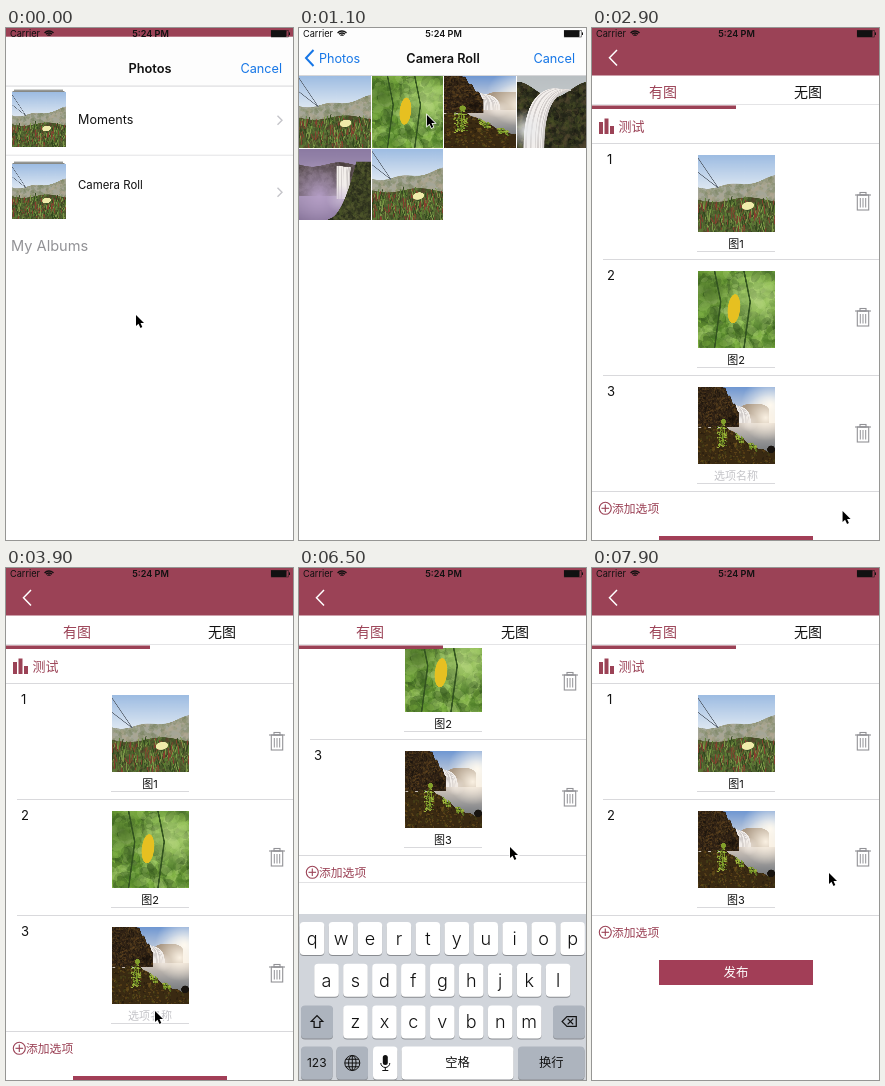
These frames come from a looping animation (287x512 px, 8 s). An HTML page with a canvas:

```html
<!DOCTYPE html>
<html lang="zh">
<head>
<meta charset="utf-8">
<title>Photo poll</title>
<style>
html, body { margin: 0; width: 100%; height: 100%; overflow: hidden; background: #fff; }
canvas { display: block; width: 287px; height: 512px; }
</style>
</head>
<body>
<canvas id="stage"></canvas>
<script>
const W = 287, H = 512, MID = 144, LOOP = 8000, STEP = 100, ROW = 116;
const MAROON = '#9b4256', BLUE = '#1676e6', RULE = '#d9d9dc', GRAY = '#929296', INK = '#111';
const FONT = 'Inter, "Noto Sans CJK SC", "DejaVu Sans", sans-serif';
const stage = document.getElementById('stage');
const dpr = window.devicePixelRatio || 1;
stage.width = W * dpr;
stage.height = H * dpr;
let c = stage.getContext('2d');

// Drawing helpers
let seed = 7;
const rnd = () => (seed = seed * 16807 % 2147483647) / 2147483647;
const between = (a, b) => a + (b - a) * rnd();

function rect(x, y, w, h, color) {
  c.fillStyle = color;
  c.fillRect(x, y, w, h);
}
function stroke(color, width) {
  c.strokeStyle = color;
  c.lineWidth = width;
  c.stroke();
}
function line(color, width, ...pts) {
  c.beginPath();
  for (let i = 0; i < pts.length; i += 2) c.lineTo(pts[i], pts[i + 1]);
  stroke(color, width);
}
function oval(x, y, rx, ry, color, angle = 0) {
  c.beginPath();
  c.ellipse(x, y, rx, ry, angle, 0, 7);
  c.fillStyle = color;
  c.fill();
}
function arc(x, y, rx, ry, color, width, from = 0, to = 7) {
  c.beginPath();
  c.ellipse(x, y, rx, ry, 0, from, to);
  stroke(color, width);
}
function box(x, y, w, h, r, color) {
  c.beginPath();
  c.roundRect(x, y, w, h, r);
  c.fillStyle = color;
  c.fill();
}
function text(s, x, y, size, color, align = 'left', weight = 400) {
  c.font = `${weight} ${size}px ${FONT}`;
  c.textAlign = align;
  c.fillStyle = color;
  c.fillText(s, x, y + size * .36);
}
function at(x, y, draw, alpha = 1) {
  c.save();
  c.translate(x, y);
  c.globalAlpha *= alpha;
  draw();
  c.restore();
}
function clipTo(x, y, w, h, draw) {
  c.save();
  c.beginPath();
  c.rect(x, y, w, h);
  c.clip();
  draw();
  c.restore();
}
const chevron = (x, y, dx, dy, color, width) => line(color, width, x - dx, y - dy, x, y, x - dx, y + dy);
function cross(x, y, r, color, width, angle = 0) {
  for (const a of [angle, angle + Math.PI / 2]) {
    const dx = r * Math.cos(a), dy = r * Math.sin(a);
    line(color, width, x - dx, y - dy, x + dx, y + dy);
  }
}

// Pictures, painted once in a 100 by 100 space
function fade(top, height, ...colors) {
  const g = c.createLinearGradient(0, top, 0, top + height);
  colors.forEach((col, i) => g.addColorStop(i / (colors.length - 1), col));
  rect(0, top, 100, height, g);
}
function glow(x, y, r, rgb, alpha = 1) {
  const g = c.createRadialGradient(x, y, 0, x, y, r);
  g.addColorStop(0, `rgba(${rgb},${alpha})`);
  g.addColorStop(1, `rgba(${rgb},0)`);
  rect(0, 0, 100, 100, g);
}
// Land between a skyline y = top(x) and a level base, with a fine seeded texture
function land(x0, x1, top, base, color, grain, ...tones) {
  c.save();
  c.beginPath();
  c.moveTo(x0, base);
  for (let x = x0; x <= x1; x++) c.lineTo(x, top(x));
  c.lineTo(x1, base);
  c.fillStyle = color;
  c.fill();
  c.clip();
  c.globalAlpha = .4;
  for (let i = 0; i < 900 && tones.length; i++) {
    const r = grain * between(.3, 1);
    oval(between(x0, x1), between(0, base), r, r * .6, tones[i % tones.length], between(0, 3));
  }
  c.restore();
}
// Water as a fan of soft strokes; u runs from one bank to the other
function stream(x, y, spread, bottomX, bottomY, bottomSpread, width) {
  for (let u = 0; u <= 1; u += .04) {
    c.beginPath();
    c.moveTo(x + u * spread, y + u * 2);
    c.quadraticCurveTo(bottomX + u * bottomSpread, y + 4, bottomX + u * bottomSpread, bottomY);
    stroke(rnd() < .6 ? '#f3efec' : '#d2cdcb', width);
  }
}
function picture(w, h, paint) {
  const pic = document.createElement('canvas'), main = c;
  pic.width = w;
  pic.height = h;
  c = pic.getContext('2d');
  c.scale(w / 100, h / 100);
  paint();
  c = main;
  return pic;
}

const meadow = picture(240, 240, () => {
  fade(0, 100, '#9dbce2', '#e6edf4', '#f1f3f2');
  land(0, 100, x => 42 - 14 * (x / 100) ** 2 + 2 * Math.sin(x / 9), 100, '#a5a697', 5, '#8d9374', '#b0a590', '#79835f');
  land(0, 100, x => 58 + 3 * Math.sin(x / 14), 100, '#50602f', 4, '#6d8242', '#3b4a24', '#573e2b');
  for (let i = 0; i < 240; i++) {
    const x = between(0, 100), y = between(66, 106);
    line(['#5b7d33', '#7f9a49', '#33481f', '#86402f'][i % 4], 1.2, x, y, x + between(-4, 4), y - between(4, 14));
  }
  for (const y of [3, 22]) line('#59626e', .9, 0, y, 27, 43);
  oval(65, 66, 8, 5, '#efebaa', -.2);
});

const leaf = picture(240, 240, () => {
  land(0, 100, () => 0, 100, '#6a9c33', 12, '#8bbd4d', '#4f7f28', '#a3c96b', '#35591e', '#79ab3b');
  glow(75, 35, 45, '205,230,150', .55);
  glow(15, 25, 35, '35,65,20', .5);
  for (const x of [22, 60]) line('#335420', 2, x, 0, x + 8, 40, x, 100);
  oval(47, 49, 8, 19, '#e6c021', .1);
});

const bay = picture(432, 290, () => {
  fade(0, 50, '#6f97d2', '#b4c3da', '#efe4d4');
  glow(94, 24, 38, '255,252,244');
  land(55, 92, x => 22 + ((x - 73) / 12) ** 4, 48, '#aa9884');
  fade(47, 53, '#d6cbc0', '#8c8d8f', '#5c6165');
  glow(88, 40, 30, '255,246,232', .95);
  stream(50, 24, 5, 53, 47, 16, .9);
  glow(66, 46, 12, '240,232,224', .8);
  land(0, 53, x => Math.max(0, (x - 34) * 1.65 + 2 * Math.sin(x)), 52, '#2f2114', 2, '#54401f', '#150f0a', '#6b4d22');
  glow(45, 42, 9, '18,12,8', .8);
  const shore = x => 52 + 32 * Math.sin(Math.max(0, x - 38) / 62 * Math.PI / 2) + Math.sin(x / 2);
  land(0, 100, shore, 100, '#3a2a12', 2.2, '#7a581a', '#1d140b', '#8a6724', '#4f5219');
  oval(95, 81, 5, 5, '#17130f');
  // Plants grow along the slope
  for (let i = 0; i < 170; i++) {
    const x = [33, 30, 54, 71][i % 4] + between(-5, 5), y = shore(x) + between(-2, i % 4 < 2 ? 26 : 6);
    oval(x, y, 1, .9, ['#829f2b', '#a0b63e', '#587621'][i % 3]);
  }
  oval(33.5, 45, 3, 4, '#829f2b');
  line('#829f2b', .6, 33, 45, 32, 72);
});

const gorge = picture(240, 240, () => {
  fade(0, 100, '#b9bfc2', '#d8dbdc');
  land(0, 100, x => 8 + 22 * Math.sin(x / 100 * Math.PI) ** 2, 100, '#33351f', 6, '#23261a', '#4c5426', '#544630', '#151610');
  stream(52, 18, 24, 10, 100, 28, 2.2);
  glow(12, 75, 30, '232,234,236', .9);
});

const mist = picture(240, 240, () => {
  fade(0, 100, '#8b7aa2', '#a998b8', '#7e6c91');
  land(0, 100, x => 22 + 3 * Math.sin(x / 12), 66, '#5a4d50', 5, '#473d3a', '#6c6062');
  glow(28, 66, 52, '180,158,197');
  stream(53, 24, 20, 53, 70, 18, 1.4);
  glow(58, 70, 20, '205,190,215', .8);
  land(40, 100, x => 98 - 80 * Math.min(1, (x - 40) / 40) ** 2, 100, '#343820', 4, '#4d552a', '#25271a', '#5b6034');
});

// Motion helpers
const ease = u => u * u * (3 - 2 * u);
const ramp = (t, a, b) => ease(Math.min(1, Math.max(0, (t - a) / (b - a))));
const keyboardUp = t => ramp(t, 4100, 4500) - ramp(t, 6500, 6900);

// Pointer stops: arrival, departure, place
const stops = [
  [0, 0, 130, 287], [500, 800, 135, 152], [1100, 1100, 128, 87], [1350, 1600, 182, 85],
  [2000, 2000, 216, 460], [2300, 2800, 253, 484], [3900, 5500, 149, 443],
  [6300, 6700, 211, 279], [7100, 7350, 269, 288], [7900, 8000, 237, 305]
];
function pointer(t) {
  let x = 0, y = 0, leave = -1;
  for (const [arrive, depart, px, py] of stops) {
    const u = arrive > leave ? ramp(t, leave, arrive) : 1;
    x += (px - x) * u;
    y += (py - y) * u;
    leave = depart;
  }
  at(x, y, () => {
    const shape = new Path2D('M0 0V11L2.5 8.7 4.5 13 6.3 12 4.5 8H8Z');
    c.strokeStyle = '#fff';
    c.lineWidth = 1.5;
    c.stroke(shape);
    c.fillStyle = '#000';
    c.fill(shape);
  });
}

// Poll page
function statusBar() {
  text('Carrier', 4, 5.6, 9.2, INK);
  text('5:24 PM', MID + .5, 5.6, 9.1, INK, 'center', 600);
  for (const r of [2, 4, 6]) arc(43, 9, r, r, INK, 1.3, -2.4, -.74);
  box(265, 2.3, 15.5, 6.8, 1, INK);
  c.strokeStyle = INK;
  c.lineWidth = .5;
  c.strokeRect(265.2, 2.4, 17, 6.6);
  rect(283, 4.4, 1, 2.6, INK);
}
function bin(x, y) {
  at(x, y, () => {
    line(GRAY, 1.1, -8, -6, 8, -6);
    c.strokeRect(-3, -8.5, 6, 2.5);
    c.strokeRect(-5.7, -6, 11.4, 15);
    for (const dx of [-2.7, 0, 2.7]) line(GRAY, 1, dx, -3, dx, 6.5);
  });
}
const typed = t => t < 4500 ? '' : t < 4600 ? 't' : t < 5000 ? 'tu' : t < 5500 ? '图' : '图3';
const composing = t => /^t/.test(typed(t));

function field(t) {
  const s = typed(t), editing = t >= 4100 && t < 6500, y = 101;
  const x = editing && s ? 134 : MID;
  c.font = `11px ${FONT}`;
  const half = c.measureText(s).width / 2;
  if (composing(t)) rect(x - half, y - 6, half * 2, 12, '#b9d7ea');
  text(s || '选项名称', x, y, 11, s ? INK : '#c4c4c8', 'center');
  if (!editing) return;
  if (t % 1000 < 800) rect(x + half, y - 6.5, 1.4, 13, MAROON);
  if (s) {
    oval(171, y, 5, 5, '#c3c3c8');
    cross(171, y, 2.5, '#fff', 1, Math.PI / 4);
  }
}
function option(y, number, pic, caption, alpha = 1) {
  at(0, y, () => {
    rect(0, 0, W, ROW, '#fff');
    rect(number > 1 ? 11 : 0, 0, W, 1, RULE);
    text(number, 15, 16, 13, INK);
    c.drawImage(pic, 105.5, 12, 77.5, 77);
    caption();
    rect(105, 108, 78, 1, RULE);
    bin(271, 58);
  }, alpha);
}
function poll(t) {
  const scroll = 176 * keyboardUp(t), gone = ramp(t, 7200, 7600);
  const caption = s => () => text(s, MID, 101, 11, INK, 'center');
  rect(0, 0, W, H, '#fff');
  clipTo(0, 80, W, H, () => at(0, -scroll, () => {
    [12, 15.5, 8].forEach((h, i) => rect(7 + i * 5.5, 106 - h, 4, h, MAROON));
    text('测试', 26.5, 98, 13, MAROON);
    option(115, 1, meadow, caption('图1'));
    if (gone < 1) option(115 + ROW, 2, leaf, caption('图2'), 1 - gone);
    option(115 + ROW * (2 - gone), gone > .5 ? 2 : 3, bay, () => field(t));
    at(0, 115 + ROW * (3 - gone), () => {
      rect(0, 0, W, 90, '#fff');
      rect(0, 0, W, 1, RULE);
      arc(13.3, 17.3, 6, 6, MAROON, 1.1);
      cross(13.3, 17.3, 3.8, MAROON, 1.1);
      text('添加选项', 20, 17.3, 11.8, MAROON);
      rect(67, 45, 154, 25, '#a23e57');
      text('发布', MID, 57.5, 12.5, '#fff', 'center');
    });
  }));
  rect(0, 0, W, 47.5, MAROON);
  chevron(17.5, 29.7, -7.5, 7.7, '#fff', 1.5);
  text('有图', 71, 64, 14, MAROON, 'center');
  text('无图', 216, 64, 14, INK, 'center');
  rect(0, 76, W, 1, '#e4e4e6');
  rect(0, 77.5, MID, 3.5, MAROON);
}

// Keyboard
const KEY = '#fff', DARK = '#adb4be', PITCH = 28.95;
function key(x, y, w, label, size, color = KEY) {
  box(x, y + 1, w, 33, 4, '#898c91');
  box(x, y, w, 33, 4, color);
  text(label, x + w / 2, y + 16.5, size, INK, 'center', size === 18 ? 300 : 400);
}
function globe(x, y, r) {
  for (const rx of [r, r / 2]) arc(x, y, rx, r, INK, 1);
  cross(x, y, r, INK, 1);
  for (const dy of [-r / 2, r / 2]) line(INK, 1, x - r * .86, y + dy, x + r * .86, y + dy);
}
function microphone(x, y) {
  box(x - 2.5, y - 8, 5, 10, 2.5, INK);
  arc(x, y, 4.5, 4.5, INK, 1, 0, Math.PI);
  rect(x - .5, y + 4, 1, 4, INK);
  rect(x - 3, y + 7, 6, 1, INK);
}
function rabbit(x, y) {
  for (const side of [-1, 1]) oval(x + side * 3, y - 4, 2, 5, '#b5aaae', side * .25);
  oval(x, y + 2.5, 6, 5.5, '#b8b6ba');
  oval(x, y + 4.5, 3.5, 3, '#efedf0');
  for (const side of [-1, 1]) oval(x + side * 2.7, y + 1, 1, 1, '#333');
}
function candidates() {
  clipTo(0, 314, 254, 32, () => [...'图吐涂土兔 突途'].forEach((s, i) =>
    text(s, 15.5 + i * 34.1, 330.5, 15, INK, 'center')));
  rabbit(185.5, 330);
  rect(254, 314, 1, 32, RULE);
  line('#333', 1.3, 266, 333, 271.5, 327.5, 277, 333);
}
function keyboard(t) {
  const up = keyboardUp(t), busy = composing(t);
  if (!up) return;
  at(0, 198 * (1 - up), () => {
    rect(0, 314, W, 32, '#fff');
    rect(0, 314, W, 1, '#e2e2e4');
    rect(0, 346, W, 166, '#d1d5db');
    if (busy) candidates();
    ['qwertyuiop', 'asdfghjkl', 'zxcvbnm'].forEach((row, r) => [...row].forEach((s, i) =>
      key(W / 2 + (i - row.length / 2) * PITCH + 2, 354 + r * 41.7, 24.6, s, 18)));
    key(2, 437.4, 32, '⇧', 17, DARK);
    key(254, 437.4, 32, '⌫', 15, DARK);
    const y = 478.5;
    key(2, y, 31.5, '123', 12, DARK);
    key(37.5, y, 31.5, '', 0, DARK);
    globe(53.3, y + 16.5, 7.5);
    key(74, y, 24.5, '', 0);
    microphone(86.3, y + 16.5);
    key(102.5, y, 112, busy ? '选定' : '空格', 12.3);
    key(219, y, 66.5, busy ? '确认' : '换行', 12.3, DARK);
  });
}

// Photo picker
function album(y, label, size, labelY) {
  for (const i of [0, 1]) rect(8 - i * 1.5, y - 2.5 + i * 1.5, 49 + i * 3, 1, '#6a6d68');
  c.drawImage(meadow, 5.5, y, 54, 55);
  text(label, 72, y + labelY, size, INK);
  chevron(276, y + 28, 4.5, 4.5, '#c5c5ca', 1.4);
}
function albums() {
  rect(0, 47, W, H, '#fff');
  album(53.5, 'Moments', 12.6, 27);
  rect(0, 116, W, 1, '#e3e3e5');
  album(125.5, 'Camera Roll', 11.4, 20.5);
  text('My Albums', 5, 207, 14.6, GRAY);
}
function thumb(pic, i) {
  const side = pic.height, pitch = 72.7;
  c.drawImage(pic, (pic.width - side) / 2, 0, side, side,
    i % 4 * pitch, 48 + Math.floor(i / 4) * pitch, 71.7, 71.7);
}
function grid() {
  rect(0, 47, W, H, '#fff');
  [meadow, leaf, bay, gorge, mist, meadow].forEach(thumb);
}
function cropper() {
  rect(0, -2, W, H + 4, '#000');
  c.drawImage(bay, 0, 159.5, W, 193.5);
  c.strokeStyle = '#858585';
  c.lineWidth = 1;
  c.strokeRect(0, 111, W, 289.5);
  rect(0, 457.5, W, 60, '#161616');
  text('Cancel', 10, 485.5, 13.2, '#fff');
  text('Choose', 279, 485.5, 13, '#fff', 'right');
}
function picker(t) {
  const y = 10.7 * (1 - ramp(t, 0, 300)) + 516 * ramp(t, 2400, 2800);
  const push = ramp(t, 500, 900), crop = ramp(t, 1400, 1800);
  at(0, y, () => {
    if (crop < 1) at(-W * .3 * crop, 0, () => {
      rect(0, -2, W * 1.3, H + 4, '#fdfdfd');
      if (push < 1) at(-W * .3 * push, 0, albums);
      if (push) at(W * (1 - push), 0, grid);
      rect(0, 47, W, .7, '#c4c4c7');
      at(-70 * push, 0, () => text('Photos', MID, 30, 12.8, INK, 'center', 600), 1 - push);
      at(100 * (1 - push), 0, () => {
        text('Camera Roll', MID, 30, 12.7, INK, 'center', 600);
        text('Photos', 20, 30, 12.6, BLUE);
        chevron(7, 30, -7.5, 8, BLUE, 2);
      }, push);
      text('Cancel', 276, 30, 12.7, BLUE, 'right');
    });
    if (crop) at(W * (1 - crop), 0, cropper);
  });
}

function frame(now) {
  const t = Math.floor(now % LOOP / STEP) * STEP;
  c.setTransform(dpr, 0, 0, dpr, 0, 0);
  poll(t);
  keyboard(t);
  if (t < 2800) picker(t);
  if (t <= 1400 || t >= 2500) statusBar();
  pointer(t);
  requestAnimationFrame(frame);
}
requestAnimationFrame(frame);
</script>
</body>
</html>
```
